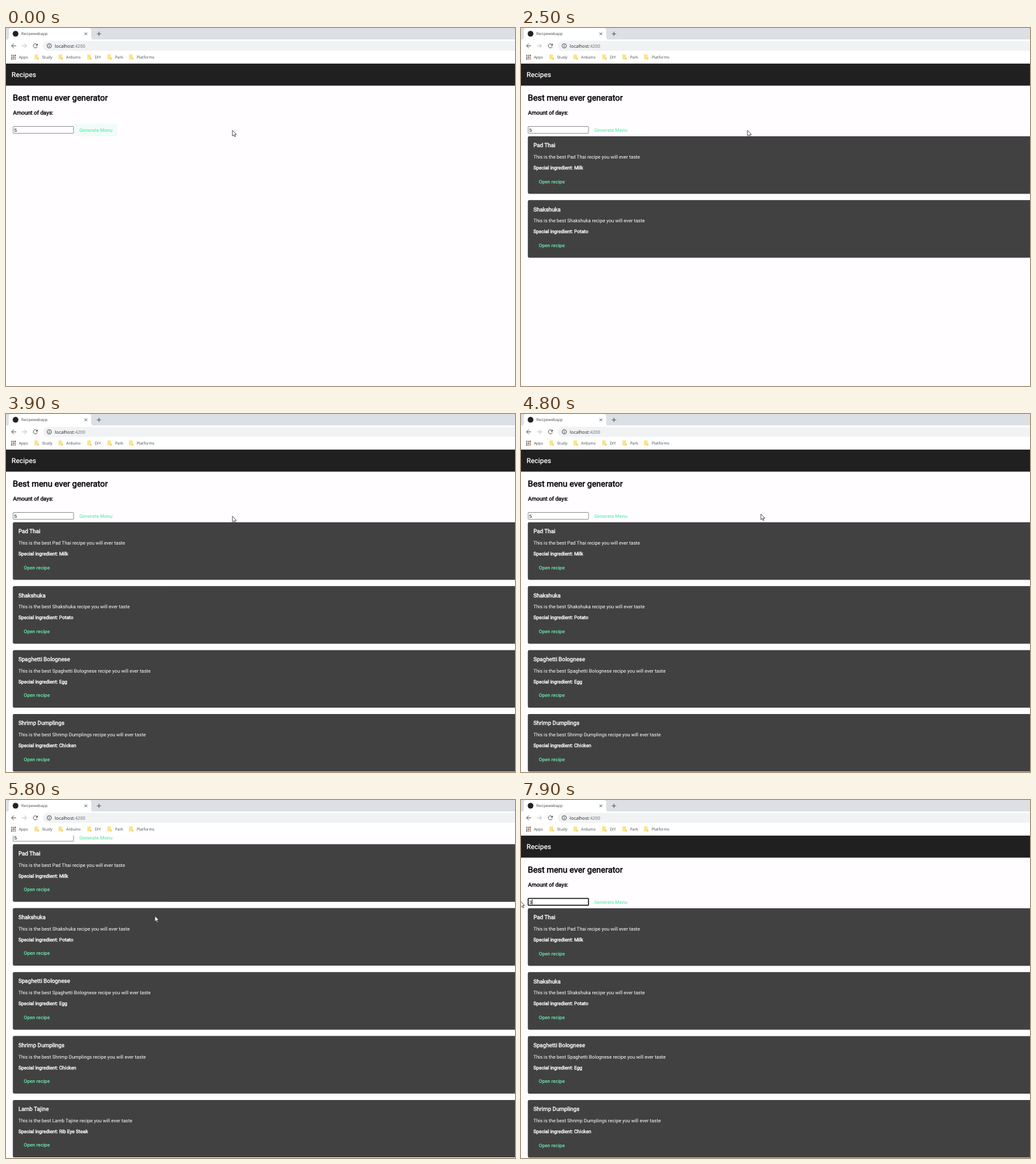
These frames come from a looping animation (800x562 px, 8 s). An HTML page:

```html
<!DOCTYPE html>
<html lang="en">
<head>
<meta charset="utf-8">
<title>Recipewebapp</title>
<style>
  html, body { margin: 0; width: 100%; height: 100%; overflow: hidden; background: #fffdff; }
  svg { display: block; width: 100%; height: 100%; }
  text { text-rendering: geometricPrecision; white-space: pre; }
  #page { font-family: Roboto, sans-serif; font-size: 7.62px; }
  #chrome { font-family: "Open Sans", "Noto Sans", sans-serif; font-size: 6.15px; fill: #45484c; }
  .bold { stroke: currentColor; fill: currentColor; stroke-width: .36px; }
  .link { fill: #69f0ae; font-weight: 500; }
  .card rect { fill: #424142; filter: drop-shadow(0 .6px .6px rgba(0, 0, 0, .35)); }
  .card { color: #fff; fill: #fff; }
  .icon { fill: none; stroke: #505357; stroke-width: 1; }
</style>
</head>
<body>
<svg viewBox="0 0 800 562" preserveAspectRatio="none">
  <defs><clipPath id="view"><rect y="55.5" width="800" height="507"/></clipPath></defs>
  <rect width="800" height="562" fill="#fffdff"/>

  <g id="page" clip-path="url(#view)">
    <g id="content">
      <rect y="55.5" width="800" height="35" fill="#212021"/>
      <text x="8.7" y="77" font-size="10.9" font-weight="500" fill="#fff">Recipes</text>
      <text class="bold" x="10.8" y="114" font-size="13.1" style="stroke-width:.5px">Best menu ever generator</text>
      <text class="bold" x="11" y="136.3" font-size="8.7">Amount of days:</text>
      <rect id="field" rx=".8" fill="#fff"/>
      <rect id="mark" x="12.8" y="156" width="4.4" height="8" fill="#1a73e8"/>
      <text id="days" x="13" y="162.7" font-size="7.3" font-family="Liberation Sans, Arial, sans-serif">5</text>
      <rect id="caret" x="17.2" y="156" width=".8" height="8"/>
      <rect id="ripple" x="108" y="150.3" width="67" height="19.7" rx="2.2" fill="#69f0ae"/>
      <text class="link" x="115.2" y="162.6">Generate Menu</text>
      <g id="cards"></g>
    </g>
  </g>

  <g id="chrome">
    <rect width="800" height="18.5" fill="#dcdfe4"/>
    <rect y="18" width="800" height="37.5" fill="#fff"/>
    <path d="M0 18.5Q4.5 18.5 4.5 14V4Q4.5 0 8.5 0H130Q134 0 134 4V14Q134 18.5 138.5 18.5Z" fill="#fff"/>
    <circle cx="15" cy="9" r="4.5" fill="#222"/>
    <text x="24" y="11.3" font-size="6.1">Recipewebapp</text>
    <path class="icon" d="M123.5 7.2l4 4m0-4l-4 4M142.8 9.2h6.6m-3.3-3.3v6.6"/>
    <rect x="58" y="20.3" width="760" height="15.4" rx="7.7" fill="#f0f2f4"/>
    <path class="icon" d="M15.8 28H8.7m3.5-3.5L8.7 28l3.5 3.5"/>
    <path class="icon" d="M25.2 28h7.1m-3.5-3.5l3.5 3.5-3.5 3.5" style="stroke:#b9bbbe"/>
    <path class="icon" d="M49.2 29A3.2 3.2 0 1 1 48.6 25.9"/>
    <path d="M49.9 24.2v3.4h-3.4z"/>
    <circle class="icon" cx="68" cy="28" r="3.4" stroke-width=".8"/>
    <path class="icon" d="M68 27.5v2.4M68 25.9v.9"/>
    <text x="76.8" y="30.6" font-size="7.1" fill="#202124">localhost<tspan fill="#6a6e73">:4200</tspan></text>
    <text x="20.2" y="47.7">Apps</text>
    <g id="marks"></g>
  </g>

  <path id="cursor" d="M0 0V9L2.1 7.1 3.4 10.2 4.9 9.6 3.6 6.6H6.3Z" fill="#fff" stroke="#333" stroke-width=".8"/>
</svg>

<script>
const LOOP = 8000, STEP = 100, PITCH = 100.35;
const FIRST_CARD = 700, CARD_GAP = 1000;
const FOCUS = 6700, SELECT = 6900, TYPE = 7600;

const $ = id => document.getElementById(id);
const show = (el, on) => el.setAttribute("visibility", on ? "visible" : "hidden");
const setAll = (el, attrs) => Object.entries(attrs).forEach(([k, v]) => el.setAttribute(k, v));
const clamp = v => Math.min(1, Math.max(0, v));
const progress = (t, from, to) => clamp((t - from) / (to - from));
const easeOut = p => 1 - (1 - p) ** 4;
const easeInOut = p => p * p * (3 - 2 * p);

const recipes = [
  ["Pad Thai", "Milk"],
  ["Shakshuka", "Potato"],
  ["Spaghetti Bolognese", "Egg"],
  ["Shrimp Dumplings", "Chicken"],
  ["Lamb Tajine", "Rib Eye Steak"],
];

$("cards").innerHTML = recipes.map(([name, extra], i) => `
  <g class="card" transform="translate(0 ${170 + i * PITCH})">
    <rect x="10.8" width="810" height="90.2" rx="2.2"/>
    <text class="bold" x="19.4" y="17.2" font-size="8.85">${name}</text>
    <text x="19.4" y="35.1">This is the best ${name} recipe you will ever taste</text>
    <text class="bold" x="19.4" y="52.1">Special ingredient: ${extra}</text>
    <text class="link" x="28" y="73.6">Open recipe</text>
  </g>`).join("");
const cards = [...$("cards").children];

// Bookmark bar: app grid and folders
const gridColors = ["#d9574b", "#4d9a63", "#4a5058"];
let bar = "";
for (let i = 0; i < 9; i++) {
  bar += `<rect x="${8 + i % 3 * 2.8}" y="${42 + Math.floor(i / 3) * 2.8}" width="1.9" height="1.9" fill="${gridColors[(i + Math.floor(i / 3)) % 3]}"/>`;
}
const folders = [["Study", 56.7], ["Arduino", 94.5], ["DIY", 139.6], ["Park", 171.4], ["Platforms", 205.3]];
for (const [name, x] of folders) {
  bar += `<path d="M${x - 12} 41.5h5.6v5.2h1.2v2.6h-6.8z" fill="#fbe38b"/>
    <path d="M${x - 6.4} 46.7h1.2v2.6h-2.4z" fill="#e9c85a"/>
    <text x="${x}" y="47.7">${name}</text>`;
}
$("marks").innerHTML = bar;

// Pointer stops: time, x, y
const stops = [
  [0, 355.9, 160.5], [4400, 355.9, 160.5], [4700, 377, 157], [4800, 377, 157],
  [5000, 375.7, 179.5], [5400, 375.7, 180], [5800, 234, 182], [6300, 200, 168],
  [6700, 60, 160], [6800, 50, 160], [7100, -.6, 159], [LOOP, -.6, 159],
];

function pointerAt(t) {
  const i = stops.findIndex(s => s[0] > t);
  const [t0, x0, y0] = stops[i - 1], [t1, x1, y1] = stops[i];
  const p = easeInOut(progress(t, t0, t1));
  return [x0 + (x1 - x0) * p, y0 + (y1 - y0) * p];
}

function scrollAt(t) {
  return 100.5 * (easeOut(progress(t, 4850, 5100)) - easeOut(progress(t, 5950, 6200)));
}

function draw(t) {
  $("content").setAttribute("transform", `translate(0 ${-scrollAt(t)})`);
  cards.forEach((card, i) => show(card, t >= FIRST_CARD + i * CARD_GAP));
  $("ripple").setAttribute("opacity", .1 * (1 - progress(t, 0, 400)));

  const focused = t >= FOCUS, typed = t >= TYPE;
  const selected = t >= SELECT && !typed;
  setAll($("field"), focused
    ? { x: 11.3, y: 154.5, width: 94.8, height: 10.8, stroke: "#101010", "stroke-width": 1.5 }
    : { x: 11.2, y: 154.5, width: 95, height: 10.8, stroke: "#767676", "stroke-width": .8 });
  $("days").textContent = typed ? "3" : "5";
  $("days").setAttribute("fill", selected ? "#fff" : "#000");
  show($("mark"), selected);
  show($("caret"), typed || focused && !selected);

  $("cursor").setAttribute("transform", `translate(${pointerAt(t)})`);
}

const start = performance.now();
function tick() {
  const t = (performance.now() - start) % LOOP;
  draw(Math.floor(t / STEP) * STEP);
  requestAnimationFrame(tick);
}
tick();
</script>
</body>
</html>
```
